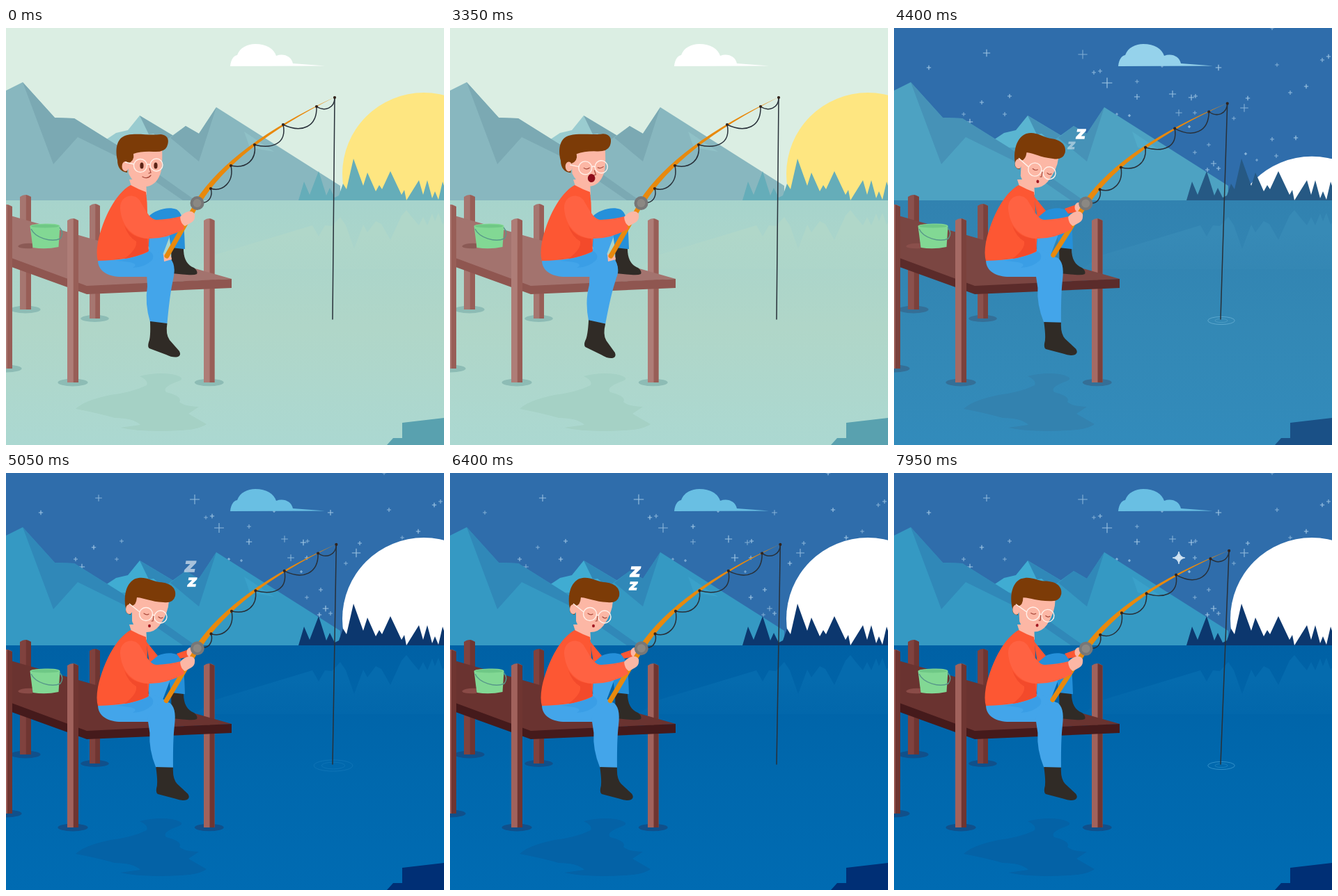
Recreate the animation shown at these times as an HTML page. Size 629x600 px, loop 8000 ms.

```html
<!DOCTYPE html>
<html lang="en">
<head>
<meta charset="utf-8">
<title>Fishing until night</title>
<style>
html, body { margin: 0; width: 100%; height: 100%; overflow: hidden; background: #dbeee3; }
svg { display: block; width: 100vw; height: 100vh; }
.sky { fill: var(--sky); }
.cloud { fill: var(--cloud); }
.hill { fill: var(--hill); }
.shade { fill: var(--shade); }
.peak { fill: var(--peak); }
.tree { fill: var(--tree); }
.pool { fill: var(--pool); }
.rock { fill: var(--rock); }
.ring { fill: var(--ring); }
.deck { fill: var(--deck); }
.edge { fill: var(--edge); }
.post { fill: var(--post); }
.postDark { fill: var(--postDark); }
.backPost { fill: var(--backPost); }
.deckShadow { fill: var(--deckShadow); }
.skin { fill: #fcb7a5; }
.hair { fill: #7c3b07; }
.shirt { fill: #fd5733; }
.sleeve { fill: #ff6242; }
.pants { fill: #43a5ea; }
.pantsDark { fill: #2590da; }
.boot { fill: #302b26; }
.wire { fill: none; stroke: #283039; stroke-width: 1.5; stroke-linecap: round; }
.glass { fill: none; stroke: #fff0e9; stroke-width: 1.4; }
.mark { fill: none; stroke: #a94b3d; stroke-width: 1.2; stroke-linecap: round; }
#ripples ellipse { fill: none; stroke: var(--ripple); stroke-width: 1; }
#stars path { fill: none; stroke: #b4d6ee; stroke-width: 1.1; }
#zs text { font: italic 900 18px Inter, "DejaVu Sans", sans-serif; fill: #fff; stroke: #fff; stroke-width: 1.5; text-anchor: middle; dominant-baseline: central; }
</style>
</head>
<body>
<svg viewBox="0 0 629 600" preserveAspectRatio="xMidYMid slice">
  <defs>
    <linearGradient id="water" x1="0" y1="0" x2="0" y2="1">
      <stop offset="0" style="stop-color:var(--water1)"/>
      <stop offset=".52" style="stop-color:var(--water2)"/>
      <stop offset="1" style="stop-color:var(--water3)"/>
    </linearGradient>
    <linearGradient id="mirror" x1="0" y1="0" x2="0" y2="1">
      <stop offset=".4" style="stop-color:var(--mirror)"/>
      <stop offset="1" style="stop-color:var(--mirror);stop-opacity:.35"/>
    </linearGradient>
    <clipPath id="horizon"><path d="M0 0H629V248H0Z"/></clipPath>
  </defs>

  <path class="sky" d="M0 0H629V249H0Z"/>
  <g id="stars"></g>
  <path class="cloud" d="M322 55C323 45 327 40 332 39C336 28 347 23 358 23C374 23 385 30 388 40C399 36 410 41 412 51L458 54.5Z"/>
  <g clip-path="url(#horizon)">
    <circle id="sun" cx="600" r="117" fill="#fee681"/>
    <circle id="moon" cx="600" r="117" fill="#fff"/>
  </g>

  <path class="peak" d="M143 161L158 151L175 147L192 126L242 156L230 200H165Z"/>
  <path class="shade" d="M192 126L242 156L228 166L212 152L205 153Z"/>
  <path class="hill" d="M0 90L24 78L70 129L98 130L165 172L215 172L258 141L277 152L302 114L480 227V248H0Z"/>
  <path class="shade" d="M24 78L70 129L98 130L165 172L272 248H254L170 190L103 157L68 196Z"/>
  <path class="shade" d="M302 114L277 192L236 158L258 141L277 152Z"/>
  <path class="peak" opacity=".45" d="M342 149L385 178L350 172Z"/>
  <path class="tree" d="M420 248L428 221L436 240L449 206L460 241L465 230L472 244L478 241L484 224L489 232L499 188L513 227L519 208L531 235L536 226L540 232L552 206L568 240L572 233L575 248L593 219L599 240L605 219L612 245L616 235L621 247L627 221L629 227V248Z"/>

  <path d="M0 248H629V600H0Z" fill="url(#water)"/>
  <path fill="url(#mirror)" d="M298 327L440 284L449 300L458 284L468 285L480 272L488 284L500 318L513 283L519 294L531 278L539 282L552 305L568 270L575 262L582 271L593 284L599 272L605 284L612 267L616 278L621 266L627 283L629 280V347H270Z"/>
  <path class="pool" d="M192 501Q215 495 238 498Q260 503 248 508Q223 517 230 524Q254 530 249 538Q255 544 277 545Q268 551 262 555L288 570Q277 578 250 579Q195 582 164 575L193 571Q183 561 156 561Q132 554 100 548Q112 536 150 528Q182 524 202 514Q205 507 192 501Z"/>
  <path class="rock" d="M547 600L556 590H569V568L629 561V600Z"/>
  <g id="ripples"><ellipse cx="470" cy="421"/><ellipse cx="470" cy="421"/></g>

  <g id="backPosts"></g>
  <path class="deck" d="M0 268L10 271L324 361L116 372L0 329Z"/>
  <path class="edge" d="M0 328L116 371L324 361V374L116 383L0 341Z"/>
  <path class="deckShadow" d="M17 314Q22 309 38 310V317Q20 318 17 314Z"/>
  <path d="M34.500 285Q35 282 56 281.500Q77 281 77.500 285L75.500 315Q57 319 38.500 316Z" fill="#82d894"/>
  <ellipse cx="56" cy="285" rx="20" ry="2.500" fill="#6fc886"/>
  <path d="M36 289C42 302 65 309 78 303Q84 295 77 287" fill="none" stroke="#58988a" stroke-width="1.4"/>
  <g id="frontPosts"></g>

  <!-- angler -->
  <path class="pantsDark" d="M203 312L205 271C214 262 232 256 245 261C255 267 256 286 257 318H237L234 296L212 325Z"/>
  <path class="pants" d="M206 300L236 283L235 300L224 329L205 322Z"/>
  <path class="boot" d="M237 316L255 318C255 332 260 341 270 345Q276 350 274 354Q270 356 260 355L238 353Z"/>
  <g id="farArm">
    <path class="shirt" d="M201 242L218 263L206 273Z"/>
    <path class="shirt" d="M245 260L262 254L265 264L250 267Z"/>
    <ellipse class="skin" cx="265" cy="258" rx="5.500" ry="7"/>
  </g>
  <path class="pants" d="M132 334C132 350 147 358 166 358H206L234 366C245 355 243 338 232 330Q220 320 204 318Z"/>
  <path class="pantsDark" opacity=".3" d="M158 335Q190 330 206 321Q214 326 210 334Q198 345 182 345Q196 337 158 335Z"/>
  <g id="shin">
    <path class="pants" d="M202 352C206 334 224 326 236 332C244 340 242 354 239 367Q235 386 231.500 425L207 423Q199 396 203 372Z"/>
    <path class="boot" d="M207 422L231.500 425Q229 441 235 449L249 465Q252 471 247 473Q240 475 230 470L206 461Q203 459 205 452Q208 445 207 422Z"/>
  </g>
  <path class="skin" d="M177 218H201L202 240L182 234Z"/>
  <path class="shirt" d="M179 226Q190 232 201 236Q203 250 203 266L206 296L204 322Q180 334 132 335Q129 325 132 308C139 275 157 238 179 226Z"/>
  <path d="M170 284Q180 302 203 303L205 321Q186 330 170 332Q189 318 187 307Q175 300 170 284Z" fill="#f34a2b"/>
  <path id="restHand" class="skin" d="M226 325Q237 324 238 333L227 336Z"/>

  <g id="dayHead">
    <path class="skin" d="M176 172H224Q225 190 223 205Q218 225 203 228Q185 229 176 209Z"/>
    <path class="hair" d="M160 190C156 172 160 157 174 154C190 151 205 155 222 153C233 154 235 162 231 171Q227 179 212 178Q195 177 183 181Q185 191 175 195L174 208Q160 206 160 190Z"/>
    <ellipse class="skin" cx="171.500" cy="199" rx="5" ry="7"/>
    <g id="dayFace">
      <path class="mark" d="M206 202L208 208L205 209"/>
      <g id="openEyes" fill="#5b2417"><ellipse cx="195" cy="198" rx="2.600" ry="4.500"/><ellipse cx="215" cy="198" rx="2.600" ry="4.500"/></g>
      <path id="shutEyes" class="mark" d="M191 198Q195 201 199 198M211 198Q215 200 219 197"/>
      <path class="glass" d="M171 193L184 196M202 197Q205 195 207 197"/>
      <circle class="glass" cx="193" cy="198" r="9.500"/><circle class="glass" cx="216" cy="197" r="9"/>
      <path id="mouth" class="mark"/>
      <ellipse id="yawn" cx="201.500" cy="213" fill="#8d0d1a"/>
    </g>
  </g>
  <g id="nightHead">
    <path class="skin" d="M181 175L234 184Q233 203 220 220Q212 230 200 229Q185 226 181 213Z"/>
    <path class="hair" d="M172 195C168 174 174 157 186 152C200 148 207 155 220 157C238 158 245 167 243 177Q240 188 226 186C207 185 200 180 188 179Q187 190 181 191L179 204Q171 203 172 195Z"/>
    <ellipse class="skin" cx="177" cy="196" rx="5" ry="7"/>
    <path class="glass" d="M177 188L192 200M210 204L213 205"/>
    <circle class="glass" cx="201" cy="203" r="9.500"/><circle class="glass" cx="222" cy="207" r="9"/>
    <path class="mark" d="M198 202Q202 205 205 203M219 207Q222 210 225 208M212 206L211 213L209 213"/>
    <ellipse cx="206" cy="220" rx="2" ry="2.300" fill="#a11822"/>
  </g>

  <path id="line" class="wire"/>
  <g id="rod">
    <path d="M231 328L277 248" stroke="#e8890d" stroke-width="7" stroke-linecap="round"/>
    <path d="M272.500 248Q325 168 472 99.500Q330 170.500 279.500 252Z" fill="#e8890d"/>
    <path class="wire" d="M284 251C293 250 297 240 294 231C311 236 328 222 323 198C345 203 360 190 357 168C380 174 404 168 398 139C425 152 447 142 446 113C458 121 472 115 472 100"/>
    <g id="guides" fill="#33241c"></g>
    <circle cx="274.500" cy="252" r="10" fill="#777"/><circle cx="274.500" cy="252" r="6" fill="#8b8883"/>
  </g>
  <path class="sleeve" d="M164 260C163 241 183 236 192 248C203 267 208 276 217 276Q236 275 251 271L256 289Q230 304 203 303C180 301 166 284 164 260Z"/>
  <path class="skin" d="M250 272Q254 266 262 264Q268 263 271 268Q272 277 266 280L257 285Q251 282 250 272Z"/>
  <g id="zs"></g>
</svg>
<script>
const LOOP = 8000;
const $ = id => document.getElementById(id);
const svgNode = (parent, tag, attrs) => {
  const node = document.createElementNS("http://www.w3.org/2000/svg", tag);
  set(node, attrs);
  return parent.appendChild(node);
};
function set(node, attrs) {
  for (const key in attrs) node.setAttribute(key, attrs[key]);
}

// name: [day, night]
const palette = {
  sky: ["dbeee3", "2f6dab"], cloud: ["ffffff", "69bfe3"],
  hill: ["88b7bf", "3599c3"], shade: ["7ba9b3", "3088b8"], peak: ["9accd0", "40acd2"],
  tree: ["65adb9", "0c376e"], mirror: ["b0d7c9", "056bae"], pool: ["a5d1c5", "0462a6"],
  rock: ["59a1af", "002f75"], ring: ["8dbcb5", "10508b"], ripple: ["d0e9e0", "439dd2"],
  water1: ["a7d4cc", "0061a5"], water2: ["b0d6c8", "0068ad"], water3: ["abd8d1", "006bb2"],
  deck: ["a3736e", "6a3330"], edge: ["8f5650", "451a1b"], deckShadow: ["8b5a55", "8a4b47"],
  post: ["ae7d77", "a1625c"], postDark: ["985e57", "6f3531"], backPost: ["a67670", "80423e"]
};
const channels = hex => [0, 2, 4].map(i => parseInt(hex.slice(i, i + 2), 16));
const mix = ([day, night], p) => {
  const to = channels(night);
  return `rgb(${channels(day).map((c, i) => Math.round(c + (to[i] - c) * p))})`;
};

const ease = (t, from, to) => {
  const u = Math.min(1, Math.max(0, (t - from) / (to - from)));
  return u * u * (3 - 2 * u);
};
const track = (t, keys) => keys.reduce((v, [time, next], i) =>
  i ? v + (next - keys[i - 1][1]) * ease(t, keys[i - 1][0], time) : next, 0);

function addPost(group, x, top, bottom, width, main) {
  svgNode(group, "ellipse", { class: "ring", cx: x + width / 2, cy: bottom, rx: width * 1.35, ry: width * .34 });
  svgNode(group, "path", { class: main, d: `M${x} ${top + 3}Q${x + width / 2} ${top - 3} ${x + width} ${top + 3}V${bottom}H${x}Z` });
  svgNode(group, "path", { class: "postDark", d: `M${x + width * .55} ${top}L${x + width} ${top + 3}V${bottom}H${x + width * .55}Z` });
}
addPost($("backPosts"), 20, 240, 405, 16, "backPost");
addPost($("backPosts"), 120, 253, 418, 15, "backPost");
addPost($("backPosts"), 284, 274, 510, 15.5, "post");
addPost($("frontPosts"), -7, 254, 490, 16, "post");
addPost($("frontPosts"), 88, 274, 510, 16, "post");

[[294, 231], [323, 198], [357, 168], [398, 139], [446, 113], [472, 100]].forEach(([cx, cy]) =>
  svgNode($("guides"), "circle", { cx, cy, r: 2.1 }));

// x, y, arm length
const stars = [
  [133, 36, 5], [271, 38, 7], [50, 57, 3], [287, 64, 3], [296, 62, 3], [306, 79, 7], [349, 77, 3],
  [349, 99, 4], [400, 95, 5], [385, 55, 2], [466, 57, 4], [543, 0, 3], [615, 46, 3], [624, 41, 3],
  [550, 53, 3], [592, 84, 3], [569, 93, 3], [503, 115, 6], [508, 101, 3], [488, 130, 3], [126, 107, 3],
  [166, 98, 3], [100, 124, 3], [109, 135, 4], [159, 124, 3], [320, 124, 2], [338, 126, 2], [409, 122, 5],
  [427, 100, 4], [433, 98, 3], [432, 122, 3], [424, 142, 2], [432, 179, 3], [459, 195, 4], [466, 202, 3],
  [452, 168, 3], [505, 181, 2], [543, 160, 3], [549, 184, 3], [577, 158, 3], [521, 190, 2], [450, 204, 3]
].map(([x, y, r]) => ({
  x, y, node: svgNode($("stars"), "path", { d: `M${-r} 0H${r}M0 ${-r}V${r}` })
}));
const brightStar = svgNode($("stars"), "path", {
  d: "M409 113Q410 121 418 122Q410 123 409 131Q408 123 400 122Q408 121 409 113Z",
  style: "fill:#e8f4fc;stroke:#e8f4fc"
});

const births = [3440, 4230, 5050, 5850];
const letters = births.map(() => {
  const node = svgNode($("zs"), "text", {});
  node.textContent = "Z";
  return node;
});

function drawRipples(t) {
  [...$("ripples").children].forEach((node, i) => {
    const age = (t % 3550 - 250 - i * 330) / 1550;
    const live = age > 0 && age < 1 - i * .2;
    const r = live ? 31 * Math.sqrt(age) * (i ? .7 : 1) : 0;
    const strength = i ? .5 : 1.2;
    set(node, { rx: r, ry: r * .29, opacity: live ? Math.min(1, age * 8) * (1 - age) * strength : 0 });
  });
}

function drawHeads(t) {
  const down = ease(t, 450, 1100);
  const asleep = t >= 3800;
  $("dayHead").style.display = asleep ? "none" : "";
  $("nightHead").style.display = asleep ? "" : "none";
  set($("dayHead"), { transform: `rotate(${-1.5 * down + 8 * ease(t, 3450, 3850)} 188 230)` });
  set($("dayFace"), { transform: `translate(${2 * down} ${3.5 * down})` });
  const tilt = track(t, [[3750, -6], [4200, 3.5], [4400, 3], [5050, 0], [6400, 0], [7950, -3]]);
  set($("nightHead"), { transform: `rotate(${tilt} 190 228)` });

  const shut = t > 2650;
  $("openEyes").style.display = shut ? "none" : "";
  $("shutEyes").style.display = shut ? "" : "none";
  const gape = ease(t, 2650, 3150) * (1 - .7 * ease(t, 3450, 3800));
  set($("yawn"), { rx: 5.3 * gape, ry: 6 * gape });
  set($("mouth"), { d: `M196 ${214 - down}Q203 ${218 - 5 * down} 208 ${212 + down}`, opacity: 1 - ease(t, 2650, 2800) });
}

function drawRod(t) {
  const angle = ease(t, 3450, 3950) * 1.6 * (1 - Math.cos((t - 5725) / 4118 * 2 * Math.PI));
  set($("rod"), { transform: `rotate(${angle} 262 272)` });
  const a = angle * Math.PI / 180;
  const x = 262 + 210 * Math.cos(a) + 172 * Math.sin(a);
  const y = 272 - 172 * Math.cos(a) + 210 * Math.sin(a);
  set($("line"), { d: `M${x} ${y}L469 419` });
}

function drawNight(t) {
  const dusk = ease(t, 3500, 4900);
  const skyDusk = ease(t, 3450, 4350);
  for (const name in palette)
    document.documentElement.style.setProperty("--" + name, mix(palette[name], name === "sky" ? skyDusk : dusk));
  set($("sun"), { cy: 210 + 160 * ease(t, 3450, 3970) });
  set($("moon"), { cy: 370 - 160 * ease(t, 3950, 4950) });
  $("stars").style.opacity = skyDusk;
  stars.forEach(({ x, y, node }, i) => {
    const glow = Math.sin(t / 500 + i * 2.4);
    set(node, { transform: `translate(${x} ${y}) scale(${1 + .06 * glow})`, opacity: .75 + .12 * glow });
  });
  set(brightStar, { opacity: .85 * ease(t, 7650, 7950) });
}

function drawLetters(t) {
  letters.forEach((node, i) => {
    const age = t - births[i];
    const y = 171 - .0125 * age - 6.2e-6 * age * age;
    const x = track(age, [[0, 250], [400, 262], [960, 268], [1700, 264]]);
    const size = .7 + .45 * age / 1700;
    const opacity = ease(age, 0, 360) * (1 - ease(age, 1420, 1850)) * ease(t, 3900, 4150);
    set(node, { transform: `translate(${x} ${y}) scale(${size * 1.1} ${size})`, opacity });
  });
}

function render(t) {
  drawNight(t);
  drawRipples(t);
  drawHeads(t);
  drawRod(t);
  drawLetters(t);
  const swing = 5.6 * Math.sin(Math.min(t, 4029) / 1465 * 2 * Math.PI);
  set($("shin"), { transform: `rotate(${swing} 222 338)` });
  const grip = ease(t, 3600, 4000);
  set($("farArm"), { opacity: grip });
  set($("restHand"), { opacity: 1 - grip });
}

const start = performance.now();
function tick() {
  render((performance.now() - start) % LOOP);
  requestAnimationFrame(tick);
}
tick();
</script>
</body>
</html>
```
